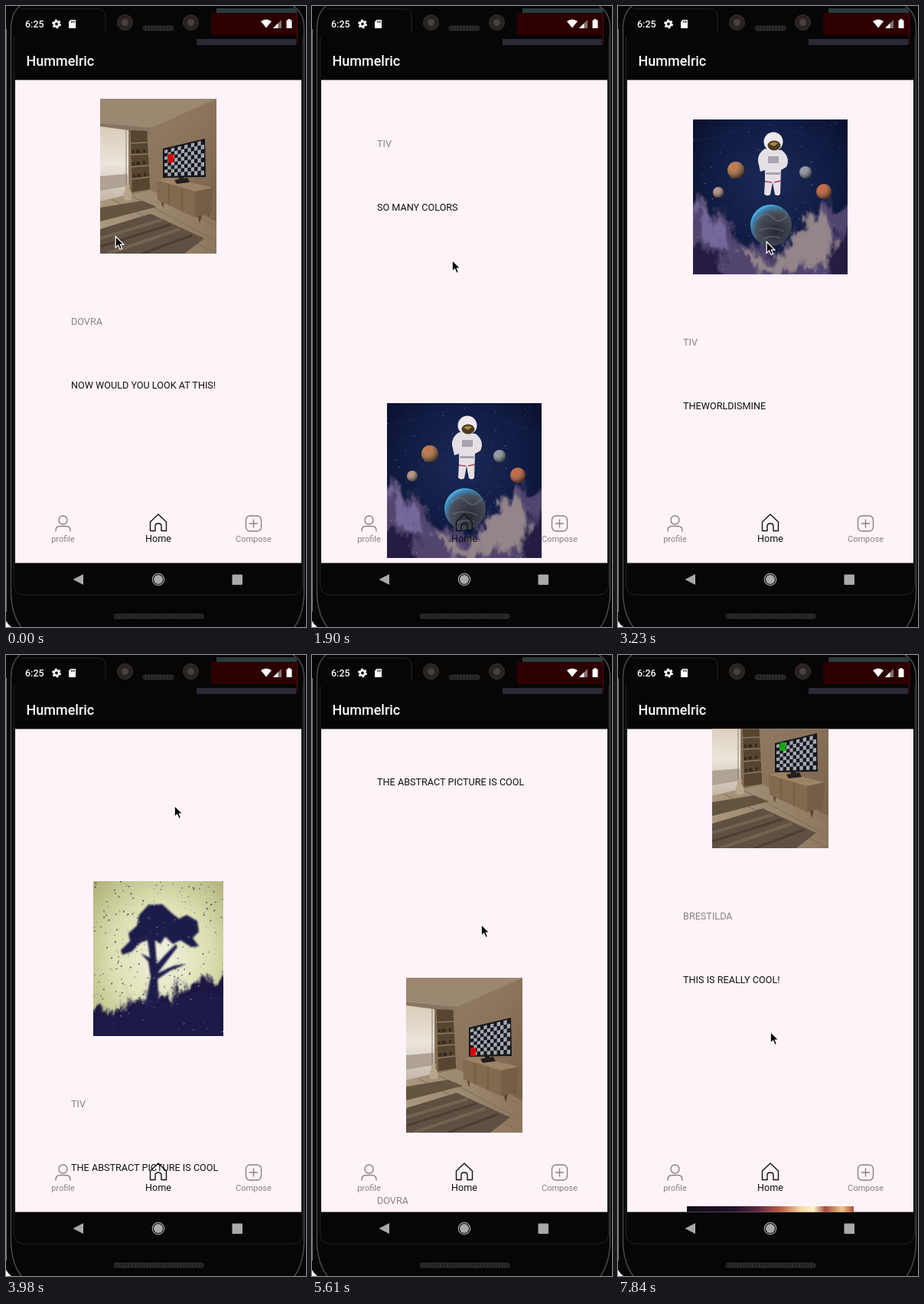
Recreate the animation shown at these times as an HTML page. Size 392x810 px, loop 7.99 s.

```html
<!DOCTYPE html>
<html lang="en">
<head>
<meta charset="utf-8">
<title>Photo feed</title>
<style>
  html, body { margin: 0; width: 100%; height: 100%; overflow: hidden; background: #000; }
  svg { display: block; }
  text { font-family: Roboto, sans-serif; }
  .post { font-size: 12.65px; fill: #111; }
  .author { fill: #8b8085; }
  .tab { font-size: 11px; text-anchor: middle; fill: #8b8085; }
  .icon { fill: none; stroke: #8b8085; stroke-width: 1.4; stroke-linejoin: round; stroke-linecap: round; }
</style>
</head>
<body>
<svg id="stage" width="392" height="810" viewBox="0 0 392 810">
  <defs>
    <clipPath id="screen"><rect x="12" y="96.500" width="374" height="630"/></clipPath>
    <filter id="soft" x="-30%" y="-30%" width="160%" height="160%"><feGaussianBlur stdDeviation="1.3"/></filter>
    <filter id="haze" x="-50%" y="-50%" width="200%" height="200%"><feGaussianBlur stdDeviation="7"/></filter>
    <filter id="rough" x="-20%" y="-20%" width="140%" height="140%">
      <feTurbulence type="fractalNoise" baseFrequency=".06 .03" numOctaves="4" seed="3" result="noise"/>
      <feGaussianBlur in="SourceGraphic" stdDeviation="3"/>
      <feDisplacementMap in2="noise" scale="48" xChannelSelector="R" yChannelSelector="G"/>
    </filter>
    <linearGradient id="wall" x1="0" y1="0" x2="1" y2="1">
      <stop offset="0" stop-color="#93816c"/><stop offset=".5" stop-color="#8b745c"/><stop offset="1" stop-color="#745d47"/>
    </linearGradient>
    <linearGradient id="window" x2="0" y2="1">
      <stop offset="0" stop-color="#d9ccb8"/><stop offset=".5" stop-color="#ebe4da"/><stop offset="1" stop-color="#c4b6a8"/>
    </linearGradient>
    <linearGradient id="floor">
      <stop offset="0" stop-color="#ab987f"/><stop offset="1" stop-color="#8c765e"/>
    </linearGradient>
    <radialGradient id="space" cy=".4" r=".7">
      <stop offset="0" stop-color="#1a2956"/><stop offset=".6" stop-color="#101b42"/><stop offset="1" stop-color="#090d26"/>
    </radialGradient>
    <radialGradient id="globe" cx=".62" cy=".66" r=".68">
      <stop offset="0" stop-color="#262932"/><stop offset=".7" stop-color="#4a505c"/><stop offset=".9" stop-color="#3c86b5"/><stop offset="1" stop-color="#54b4e6"/>
    </radialGradient>
    <radialGradient id="shade" cx=".35" cy=".3" r=".8">
      <stop offset="0" stop-color="#fff" stop-opacity=".1"/><stop offset="1" stop-color="#000" stop-opacity=".8"/>
    </radialGradient>
    <radialGradient id="sky" cx=".52" cy=".5" r=".75">
      <stop offset="0" stop-color="#f1f2e0"/><stop offset=".5" stop-color="#dcdfb0"/><stop offset="1" stop-color="#a9aa72"/>
    </radialGradient>
    <linearGradient id="nebula">
      <stop offset="0" stop-color="#120c18"/><stop offset=".28" stop-color="#22112a"/><stop offset=".42" stop-color="#5c2540"/>
      <stop offset=".56" stop-color="#c05a45"/><stop offset=".68" stop-color="#f6d9a0"/><stop offset=".76" stop-color="#fff0d0"/>
      <stop offset=".83" stop-color="#a84a35"/><stop offset=".93" stop-color="#f0c98a"/><stop offset="1" stop-color="#b04a38"/>
    </linearGradient>

    <symbol id="room" viewBox="0 0 152 202">
      <path fill="url(#wall)" d="M0 0H152V202H0Z"/>
      <path fill="#9c8871" d="M0 0H152L66 38L0 32Z"/>
      <path fill="#857460" d="M0 32L66 38V48L0 38Z"/>
      <path fill="url(#window)" d="M0 36L37 41V125L0 134Z"/>
      <path fill="#b0a294" d="M0 101L36 98V114L0 120Z"/>
      <path stroke="#8d7c6a" fill="none" d="M34 41V124"/>
      <path fill="#57452f" d="M38 41L62 42L66 118L40 122Z"/>
      <path fill="none" stroke="#8f7861" stroke-width="1.3" d="M39 58L62 57M39 73L63 72M40 89L64 87M40 105L65 102M39 41L41 121M62 42L66 118"/>
      <path fill="none" stroke="#33291f" stroke-width="4" stroke-dasharray="3 2 5 4" d="M42 69L60 68M42 85L61 83M43 101L62 98"/>
      <path fill="url(#floor)" d="M0 134L66 119L152 160V202H0Z"/>
      <path fill="none" stroke="#7f6b55" d="M40 126L152 186M15 131L150 201M75 124L152 167"/>
      <path fill="#64543f" d="M0 142L55 133L74 141L0 160Z"/>
      <path fill="#5f5043" d="M0 170L66 150L136 182L110 202H0Z"/>
      <path fill="none" stroke="#74634f" stroke-width="4" d="M0 182L80 158M10 202L104 170"/>
      <path fill="none" stroke="#4b3f33" stroke-width="3" d="M0 193L92 164M55 202L120 178"/>
      <path fill="#b7a58c" d="M33 112H39L38 118Q43 122 41 131Q36 134 31 131Q29 122 34 118Z"/>
      <path fill="#59472f" d="M79 132L84 132L82 143ZM127 151L133 152L130 163ZM139 146L143 146L142 153Z"/>
      <path fill="#9c8366" d="M74 106L92 103L147 116L124 121Z"/>
      <path fill="#826a50" d="M74 106L124 121V155L75 132Z"/>
      <path fill="#755e46" d="M124 121L147 116L145 148L124 155Z"/>
      <path fill="none" stroke="#685238" d="M90 111V139M107 116V147"/>
      <path fill="#241f1b" d="M97 106L114 103L117 109L100 111ZM103 101H109V107H103Z"/>
      <path fill="#15171c" d="M82 65L137 52L138 102L82 103Z"/>
      <path id="checks" fill="#a3a8ae"/>
      <rect id="marker" width="7" height="11"/>
    </symbol>

    <symbol id="astronaut" viewBox="0 0 202 202">
      <path fill="url(#space)" d="M0 0H202V202H0Z"/>
      <path fill="none" stroke="#33457a" stroke-width=".5" opacity=".45" d="M0 30L100 5L202 40M20 0L60 66L33 95L102 138L171 94L147 69L190 0M56 66L147 69"/>
      <g filter="url(#rough)">
        <path fill="#51446f" d="M-20 112L22 108L52 138L75 165L130 170L150 128L172 112L230 108V230H-20Z"/>
        <path fill="#93858a" d="M150 125L175 118L180 180L130 198L75 195L55 170L110 185Z"/>
        <path fill="#76679a" d="M0 120L20 116L45 150L40 175L10 150Z"/>
        <path fill="#251f42" d="M-20 165L30 172L50 230H-20ZM185 150L230 140V230H170Z"/>
      </g>
      <path id="stars" fill="#cfd2e6" opacity=".7"/>
      <g fill="#b8642c"><circle cx="56" cy="66" r="11"/><circle cx="33" cy="95" r="7" fill="#b08670"/>
        <circle cx="147" cy="69" r="8" fill="#858b98"/><circle cx="171" cy="94" r="10" fill="#c0501f"/></g>
      <g fill="url(#shade)"><circle cx="56" cy="66" r="11"/><circle cx="33" cy="95" r="7"/><circle cx="147" cy="69" r="8"/><circle cx="171" cy="94" r="10"/></g>
      <circle cx="102" cy="138" r="27" fill="url(#globe)"/>
      <path fill="none" stroke="#8a919c" stroke-width="1.5" opacity=".4" d="M83 130Q95 118 104 128T124 124M86 145Q100 138 118 146M92 156Q104 150 114 155"/>
      <path fill="#e5dfe5" d="M94 38Q84 44 85 55L88 68L94 66V80L93 97Q96 101 101 98L104 82L107 98Q112 101 114 97L115 66L122 62Q128 50 116 40Z"/>
      <circle cx="105" cy="29" r="12.5" fill="#eee9ee"/>
      <ellipse cx="106" cy="34" rx="8.5" ry="6.5" fill="#4a3b22"/>
      <path fill="#a88a3d" d="M100 32Q105 28 111 31L106 35Z"/>
      <path fill="#a9a2b0" d="M98 48H112V57H98ZM95 69H114V72H95Z"/>
      <path fill="none" stroke="#a8485a" stroke-width="1.5" d="M94 81L103 82M106 82L115 80"/>
    </symbol>

    <symbol id="tree" viewBox="0 0 170 202">
      <path fill="url(#sky)" d="M0 0H170V202H0Z"/>
      <g filter="url(#rough)" fill="#1b1742">
        <path d="M-25 172L30 170L62 142L95 154L125 134L150 126L200 130V240H-25Z"/>
      </g>
      <g filter="url(#soft)" fill="#1f1b4c">
        <path d="M36 90L48 78L46 68L57 58L60 44L72 31L90 30L103 42L112 49L122 44L136 52L138 66L130 74L138 85L128 86L114 77L104 82L94 72L88 82L78 75L62 80L50 92L38 96Z"/>
        <path d="M70 70L80 68L83 108L96 94L108 82L110 86L97 103L84 120L106 110L122 108L100 117L84 128L86 160H68L75 125L72 105L62 94L74 100Z"/>
        <path d="M0 178L40 174L65 154L100 158L140 142L170 148V202H0Z" opacity=".65"/>
      </g>
      <path id="drops" fill="#24214c" opacity=".65"/>
      <path id="glints" fill="#f1f2dc" opacity=".6"/>
    </symbol>

    <symbol id="cosmos" viewBox="0 0 218 122">
      <path fill="url(#nebula)" d="M0 0H218V122H0Z"/>
      <g filter="url(#haze)">
        <path fill="#21112c" d="M-20 60L60 75L120 100L240 90V150H-20Z"/>
        <ellipse cx="105" cy="45" rx="36" ry="15" fill="#7c2d52"/>
        <ellipse cx="165" cy="45" rx="28" ry="15" fill="#ffe9b9"/>
      </g>
    </symbol>
  </defs>

  <!-- phone body -->
  <path fill="#060606" d="M0 0H392V810H0Z"/>
  <path fill="#fff" d="M0 802Q3 807 7 810H0Z"/>
  <g fill="none">
    <path stroke="#777" d="M.5 30V790"/>
    <path stroke="#4a4a4a" stroke-width="1.5" d="M18 0Q7 9 6.5 28V768Q8 795 20 810M375 0Q389 8 389.5 28V768Q388 795 377 810"/>
    <path stroke="#242424" d="M10.5 40V755Q11 767 22 768H376Q387 767 387.5 755V40M20 4H122Q130 5 130 13V34"/>
  </g>
  <path fill="#2a3b3c" d="M275 3H380V10H275Z"/>
  <path fill="#2d0002" d="M268 9H381V38H268Z"/>
  <path fill="#2a2935" d="M249 43H379V51H249Z"/>
  <path fill="none" stroke="#5a0a10" d="M380.500 9V50"/>
  <g fill="#282320" stroke="#3a3430">
    <circle cx="155.500" cy="21.500" r="10"/><circle cx="241.500" cy="21.500" r="10"/>
    <circle cx="155.500" cy="21.500" r="4.500" fill="#4b423c"/><circle cx="241.500" cy="21.500" r="4.500" fill="#4b423c"/>
  </g>
  <g fill="none" stroke="#2a2a2a" stroke-linecap="round" stroke-width="7">
    <path d="M182 29H216"/><path d="M144 796H255"/>
    <path stroke="#151515" stroke-width="4" stroke-dasharray="1 3" stroke-linecap="butt" d="M180 29H218M142 796H257"/>
  </g>

  <!-- status bar and header -->
  <g fill="#fff">
    <text id="clock" x="25" y="28" font-size="12.5" font-weight="500"></text>
    <circle cx="66" cy="23.500" r="3.200" fill="none" stroke="#fff" stroke-width="2.600"/>
    <circle cx="66" cy="23.500" r="5" fill="none" stroke="#fff" stroke-width="2" stroke-dasharray="2.600 2.636"/>
    <path d="M84.500 18H91V29H82V20.500Z"/>
    <path stroke="#000" d="M85.500 19V22M87.500 19V22M89.300 19V22" stroke-width=".8"/>
    <path d="M333 20Q340 15 347 20L340 28.500Z"/>
    <path fill="#80706f" d="M349 29L360 18V29Z"/><path d="M349 29L355.500 22.500V29Z"/>
    <path d="M368.500 17H371.500V18.500H373.500V29H366.500V18.500H368.500Z"/>
    <text x="26.500" y="78" font-size="18" font-weight="500">Hummelric</text>
  </g>

  <!-- feed -->
  <path fill="#fef3f8" d="M12 96.500H386V726.500H12Z"/>
  <g clip-path="url(#screen)"><g id="feed"></g></g>

  <!-- tab bar -->
  <g class="icon">
    <circle cx="74.500" cy="670.500" r="5.500"/>
    <path d="M65 685V684Q65 678.500 71 678.500H78Q84 678.500 84 684V685"/>
    <rect x="313.500" y="665" width="20" height="20" rx="5.500"/>
    <path d="M323.500 670V680M318.500 675H328.500"/>
    <path stroke="#111" d="M188.500 673L199 663L209.500 673V684.500H203V678.500Q203 675 199 675T195 678.500V684.500H188.500Z"/>
  </g>
  <text class="tab" x="74.500" y="699">profile</text>
  <text class="tab" x="199" y="699" style="font-size:12.6px;fill:#111">Home</text>
  <text class="tab" x="323.500" y="699">Compose</text>

  <!-- navigation bar -->
  <g fill="#a9a9a9">
    <path d="M87.500 748L101 741V755Z"/>
    <circle cx="199" cy="748" r="6"/><circle cx="199" cy="748" r="7.700" fill="none" stroke="#a9a9a9" stroke-width="1.200"/>
    <rect x="295.500" y="741.500" width="13.500" height="13.500" rx="1"/>
  </g>

  <path id="cursor" fill="#000" stroke="#fff" stroke-width="1.2" d="M1.200 1.500V16.200L4.600 13.100L7 18.500L9.600 17.400L7.300 12.100H11.900Z"/>
</svg>

<script>
const LOOP = 7990, STEP = 148.65, ROW = 629, FIRST_TOP = 121;
const SVG = "http://www.w3.org/2000/svg";
const $ = id => document.getElementById(id);

const sizes = { room: [152, 202], cosmos: [218, 122], astronaut: [202, 202], tree: [170, 202] };
const posts = [
  ["room", "DOVRA", "NOW WOULD YOU LOOK AT THIS!"],
  ["room", "BRESTILDA", "WHATS UP WITH THIS TV"],
  ["cosmos", "TIV", "SO MANY COLORS"],
  ["astronaut", "TIV", "THEWORLDISMINE"],
  ["tree", "TIV", "THE ABSTRACT PICTURE IS COOL"],
  ["room", "DOVRA", "THIS IS A REALLY COOL", "BACKGROUND!!"],
  ["room", "BRESTILDA", "THIS IS REALLY COOL!"],
  ["cosmos", "TIV", "SO MANY COLORS"],
];

// step, scroll offset, cursor x, cursor y
const poses = [
  [0, 0, 142, 299], [2, 20, 146, 279], [4, 90, 156, 209], [6, 155, 168, 155], [7, 220, 174, 146],
  [8, 335, 178, 144], [9, 517, 178, 144], [10, 800, 178, 160], [11, 1080, 180, 210], [12, 1310, 181, 270],
  [13, 1490, 182, 330], [14, 1630, 183, 380], [15, 1718, 184, 402], [16, 1757, 184, 409], [17, 1757, 184, 409],
  [20, 1836, 190, 330], [23, 1908, 199, 258], [24, 1908, 199, 258], [25, 2000, 209, 222], [27, 2342, 219, 195],
  [28, 2475, 221, 192], [29, 2575, 224, 190], [30, 2650, 227, 188], [31, 2703, 230, 185], [32, 2740, 232, 183],
  [33, 2763, 233, 183], [37, 2795, 222, 400], [39, 2895, 217, 300], [41, 3080, 213, 165], [43, 3325, 212, 157],
  [45, 3498, 212, 156], [47, 3630, 210, 220], [49, 3735, 205, 340], [51, 3810, 200, 450], [53, 3845, 198, 490],
];

// first step, x, y, color of the block on the television
const markers = [
  [0, 89, 72, "#e00000"], [5, 85, 79, "#00b000"], [18, 89, 72, "#e00000"],
  [28, 84, 91, "#e00000"], [40, 89, 64, "#00b000"],
];

function add(parent, tag, attrs, content = "") {
  const node = document.createElementNS(SVG, tag);
  for (const key in attrs) node.setAttribute(key, attrs[key]);
  node.textContent = content;
  return parent.appendChild(node);
}

function seeded(seed) {
  return () => (seed = seed * 16807 % 2147483647) / 2147483647;
}

function specks(id, count, width, height, size, seed) {
  const random = seeded(seed);
  let d = "";
  for (let i = 0; i < count; i++) {
    const r = size * (0.4 + random());
    d += `M${random() * width} ${random() * height}l${r} ${-r}l${r * 0.6} ${r}l${-r} ${r * 0.8}z`;
  }
  $(id).setAttribute("d", d);
}

function drawChecks(cols, rows) {
  const point = (u, v) => {
    const top = 67 - 13 * u, bottom = 101 - 1.5 * u;
    return `${84 + 52 * u} ${top + (bottom - top) * v}`;
  };
  let d = "";
  for (let r = 0; r < rows; r++)
    for (let c = r % 2; c < cols; c += 2)
      d += "M" + [[c, r], [c + 1, r], [c + 1, r + 1], [c, r + 1]]
        .map(([x, y]) => point(x / cols, y / rows)).join("L") + "Z";
  $("checks").setAttribute("d", d);
}

function buildPost([picture, author, ...lines], index) {
  const post = add($("feed"), "g", { transform: `translate(0 ${FIRST_TOP + index * ROW})` });
  const [width, height] = sizes[picture];
  add(post, "use", { href: "#" + picture, x: 199 - width / 2, y: (202 - height) / 2, width, height });
  add(post, "text", { class: "post author", x: 85, y: 295 }, author);
  lines.forEach((line, i) => add(post, "text", { class: "post", x: 85, y: 377.5 + i * 15 }, line));
}

function poseAt(step) {
  const next = poses.findIndex(pose => pose[0] > step);
  if (next < 0) return poses[poses.length - 1];
  const a = poses[next - 1], b = poses[next];
  const f = (step - a[0]) / (b[0] - a[0]);
  return a.map((value, i) => value + (b[i] - value) * f);
}

function render(time) {
  // Until the first move the picture stands still a little longer.
  const step = time < 140 ? 0 : Math.min(53, Math.floor((time + 38.6) / STEP));
  const [, scroll, x, y] = poseAt(step);
  $("feed").setAttribute("transform", `translate(0 ${-Math.round(scroll)})`);
  $("cursor").setAttribute("transform", `translate(${Math.round(x)} ${Math.round(y)})`);
  $("clock").textContent = step < 43 ? "6:25" : "6:26";

  const [, markerX, markerY, color] = markers.filter(m => m[0] <= step).pop();
  $("marker").setAttribute("x", markerX);
  $("marker").setAttribute("y", markerY);
  $("marker").setAttribute("fill", color);
}

drawChecks(12, 8);
specks("stars", 110, 202, 202, 0.6, 7);
specks("drops", 260, 170, 165, 1.2, 21);
specks("glints", 150, 170, 202, 0.9, 43);
posts.forEach(buildPost);

const start = performance.now();
function tick() {
  render((performance.now() - start) % LOOP);
  requestAnimationFrame(tick);
}
tick();
</script>
</body>
</html>
```
